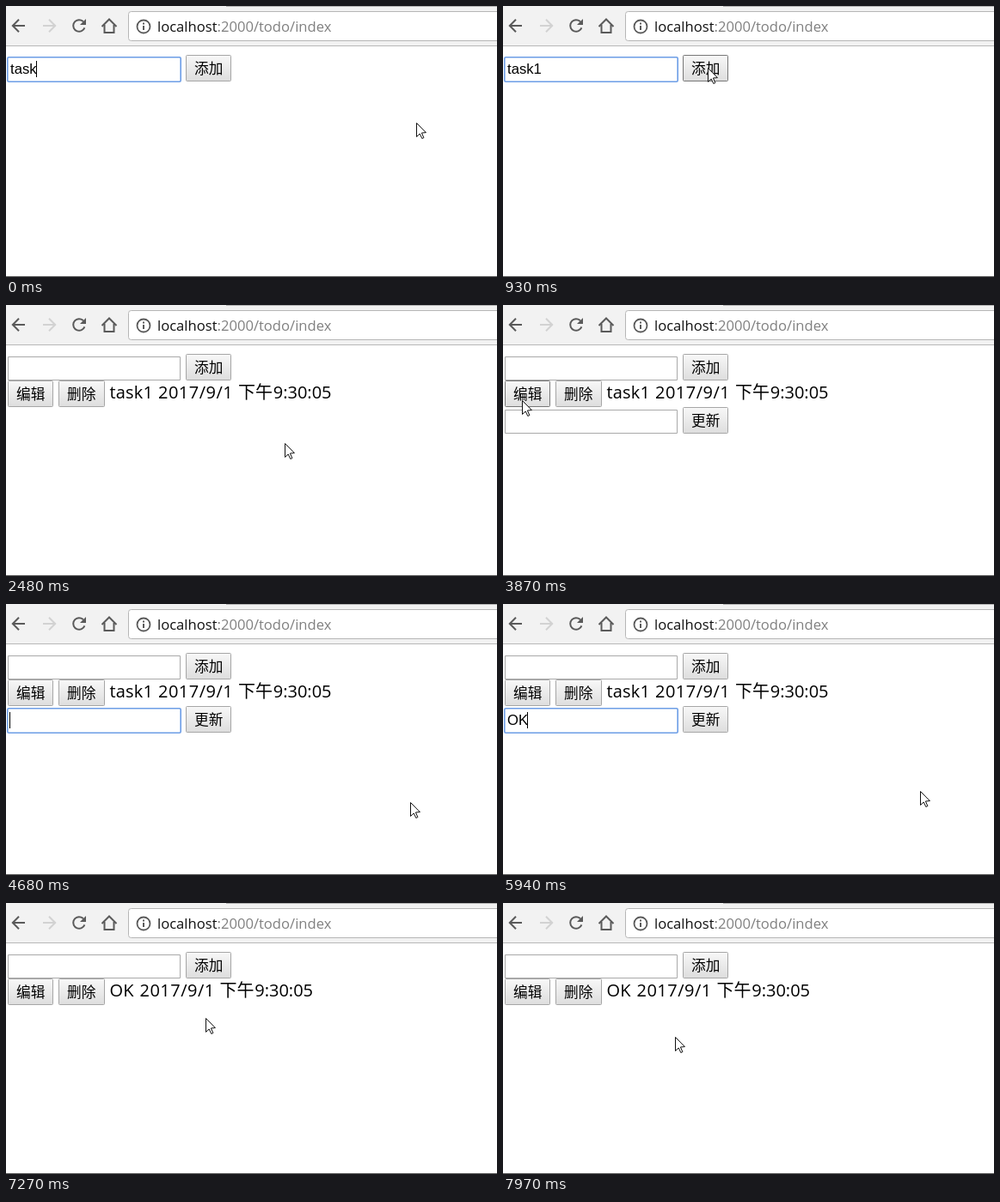
Recreate the animation shown at these times as an HTML page with a canvas. Size 571x316 px, loop 8000 ms.

```html
<!DOCTYPE html>
<html lang="zh-CN">
<head>
<meta charset="utf-8">
<title>Todo</title>
<style>
html, body { margin: 0; width: 100%; height: 100%; overflow: hidden; background: #fff; }
canvas { display: block; width: 571px; height: 316px; }
</style>
</head>
<body>
<canvas id="stage" width="571" height="316"></canvas>
<script>
const ctx = document.getElementById('stage').getContext('2d');
const LOOP = 8000;
const UI = '"Open Sans", "Noto Sans", sans-serif';
const CJK = '"Noto Sans CJK SC", "Noto Sans CJK JP", "Noto Sans CJK", sans-serif';
const FIELD = '16.67px "Liberation Sans", Arial, sans-serif';

// Pointer glides: first step, last step, step count, destination
const START = [477, 136];
const GLIDES = [
  [120, 120, 1, 479, 136], [282, 768, 4, 238, 72],
  [1630, 1910, 3, 301, 114], [2050, 2480, 4, 324, 161],
  [2630, 2630, 1, 324, 162], [2770, 3430, 6, 22, 111],
  [4003, 4136, 2, 90, 136], [4402, 4668, 3, 470, 231],
  [4800, 4800, 1, 477, 227], [4920, 5070, 2, 485, 218],
  [6340, 6340, 1, 487, 221], [6470, 6870, 4, 232, 134],
  [7420, 7560, 2, 296, 178], [7700, 7970, 3, 200, 156]
];

const within = (t, a, b) => t >= a && t < b;
const smooth = u => u * u * (3 - 2 * u);
const inside = ([px, py], x, y, w, h) => px >= x && px < x + w && py >= y && py < y + h;

function pointerAt(t) {
  let [x, y] = START;
  for (const [from, to, n, dx, dy] of GLIDES) {
    if (t < from) break;
    const step = n > 1 ? Math.floor((t - from) / (to - from) * (n - 1) + 1e-6) + 1 : 1;
    const e = smooth(Math.min(step, n) / n);
    x += (dx - x) * e;
    y += (dy - y) * e;
  }
  return [Math.round(x), Math.round(y)];
}

function box(x, y, w, h, color) {
  ctx.fillStyle = color;
  ctx.fillRect(x, y, w, h);
}

function text(str, x, y, font, color = '#000', spacing = 0) {
  ctx.font = font;
  ctx.fillStyle = color;
  ctx.letterSpacing = spacing + 'px';
  ctx.fillText(str, x, y);
  const end = x + ctx.measureText(str).width;
  ctx.letterSpacing = '0px';
  return end;
}

function line(points, color, width, closed, fill) {
  ctx.beginPath();
  points.forEach(([x, y]) => ctx.lineTo(x, y));
  if (closed) ctx.closePath();
  if (fill) { ctx.fillStyle = fill; ctx.fill(); }
  ctx.strokeStyle = color;
  ctx.lineWidth = width;
  ctx.stroke();
}

function frame(x, y, w, h, r, fill, stroke, width = 1) {
  ctx.beginPath();
  ctx.roundRect(x + width / 2, y + width / 2, w - width, h - width, r);
  ctx.fillStyle = fill;
  ctx.fill();
  ctx.strokeStyle = stroke;
  ctx.lineWidth = width;
  ctx.stroke();
}

function navArrow(cx, dir, color) {
  line([[cx - 7 * dir, 23], [cx + 7 * dir, 23]], color, 2);
  line([[cx, 15.8], [cx + 7.2 * dir, 23], [cx, 30.2]], color, 2);
}

function toolbar() {
  const ink = '#5a5a5a';
  box(0, 0, 571, 46, '#f2f2f2');
  box(256, 0, 315, 1, '#b4b4b4');
  box(0, 46, 571, 1, '#b8b8b8');
  navArrow(15, -1, ink);
  navArrow(50, 1, '#d2d2d2');

  // reload
  ctx.beginPath();
  ctx.arc(85, 23, 6.8, 0.35, 5.5);
  ctx.strokeStyle = ink;
  ctx.lineWidth = 2;
  ctx.stroke();
  ctx.beginPath();
  ctx.moveTo(93, 15);
  ctx.lineTo(93, 22);
  ctx.lineTo(86, 22);
  ctx.fillStyle = ink;
  ctx.fill();

  // home
  line([[111.5, 24], [120, 15.5], [128.5, 24]], ink, 2);
  line([[114.5, 22], [114.5, 31], [125.5, 31], [125.5, 22]], ink, 2);

  // address field
  frame(142, 6, 440, 35, 3, '#fff', '#b6b6b6');
  ctx.beginPath();
  ctx.arc(160, 24, 7.5, 0, 7);
  ctx.strokeStyle = ink;
  ctx.lineWidth = 1.8;
  ctx.stroke();
  box(159, 23, 2, 5, ink);
  box(159, 19.5, 2, 2, ink);
  const font = '16.6px ' + UI;
  const end = text('localhost', 176, 30, font, '#111');
  text(':2000/todo/index', end, 30, font, '#808080');
}

function button(label, x, y, pointer, pressed) {
  const w = label === '删除' ? 54 : 53;
  const hover = inside(pointer, x, y, w, 31);
  const g = ctx.createLinearGradient(0, y, 0, y + 31);
  const tones = pressed ? ['#dcdcdc', '#ececec'] : ['#f8f8f8', '#dddddd'];
  g.addColorStop(0, tones[0]);
  g.addColorStop(1, tones[1]);
  frame(x, y, w, 31, 1, g, hover ? '#777' : '#a6a6a6');
  text(label, x + 10, y + 22, '16.67px ' + CJK);
}

function input(value, y, focused, caret) {
  if (focused) {
    frame(1, y - 1, 203, 30, 1.5, '#fff', '#6c9de6', 1.6);
  } else {
    frame(2, y, 201, 28, 0, '#fff', '#a9a9a9');
  }
  const end = text(value, 5, y + 19, FIELD);
  if (focused && caret) box(Math.floor(end - 0.3), y + 4, 1, 19, '#000');
}

function item(name) {
  const font = '20px ' + UI;
  const x = name === 'OK' ? 155.5 : 177;
  text(name, 120.5, 109, font, '#000', 0.2);
  text('2017/9/1', x, 109, font, '#000', 0.5);
  text('下午', x + 93, 109, '20px ' + CJK);
  text('9:30:05', x + 133.7, 109, font);
}

function cursor([x, y], beam) {
  ctx.save();
  ctx.translate(x, y);
  if (beam) {
    box(0, -7, 1, 15, '#000');
    for (const dy of [-8, 7]) {
      box(-3, dy, 3, 1, '#000');
      box(1, dy, 3, 1, '#000');
    }
  } else {
    line([[0.5, 0.5], [0.5, 16.5], [4.2, 13], [6.8, 18.5], [8.9, 17.6], [6.4, 12], [11.4, 11.6]],
      '#111', 1, true, '#fff');
  }
  ctx.restore();
}

function draw(t) {
  const p = pointerAt(t);
  const hasItem = t >= 2050;
  const editing = within(t, 3870, 7270);

  box(0, 0, 571, 316, '#fff');
  toolbar();
  box(0, 315, 571, 1, '#5c5c5c');

  const task = t < 282 ? 'task' : t < 1630 ? 'task1' : '';
  input(task, 60, t < 1490, t < 768 || t >= 1210);
  button('添加', 209, 57, p, within(t, 1490, 1630));

  if (hasItem) {
    button('编辑', 2, 88, p, within(t, 3560, 3870));
    button('删除', 61, 88, p, false);
    item(t < 7270 ? 'task1' : 'OK');
  }
  if (editing) {
    const value = t < 5630 ? '' : t < 5940 ? 'O' : 'OK';
    const blinkOff = within(t, 4920, 5480) || within(t, 6470, 7000);
    input(value, 122, within(t, 4269, 7000), !blinkOff);
    button('更新', 209, 119, p, within(t, 7000, 7140));
  }

  const overField = inside(p, 2, 60, 201, 28) || (editing && inside(p, 2, 122, 201, 28));
  const overText = t >= 1910 && inside(p, 121, 90, 257, 28);
  cursor(p, overField || overText);
}

function tick(now) {
  draw(now % LOOP);
  requestAnimationFrame(tick);
}
draw(0);
requestAnimationFrame(tick);
</script>
</body>
</html>
```
